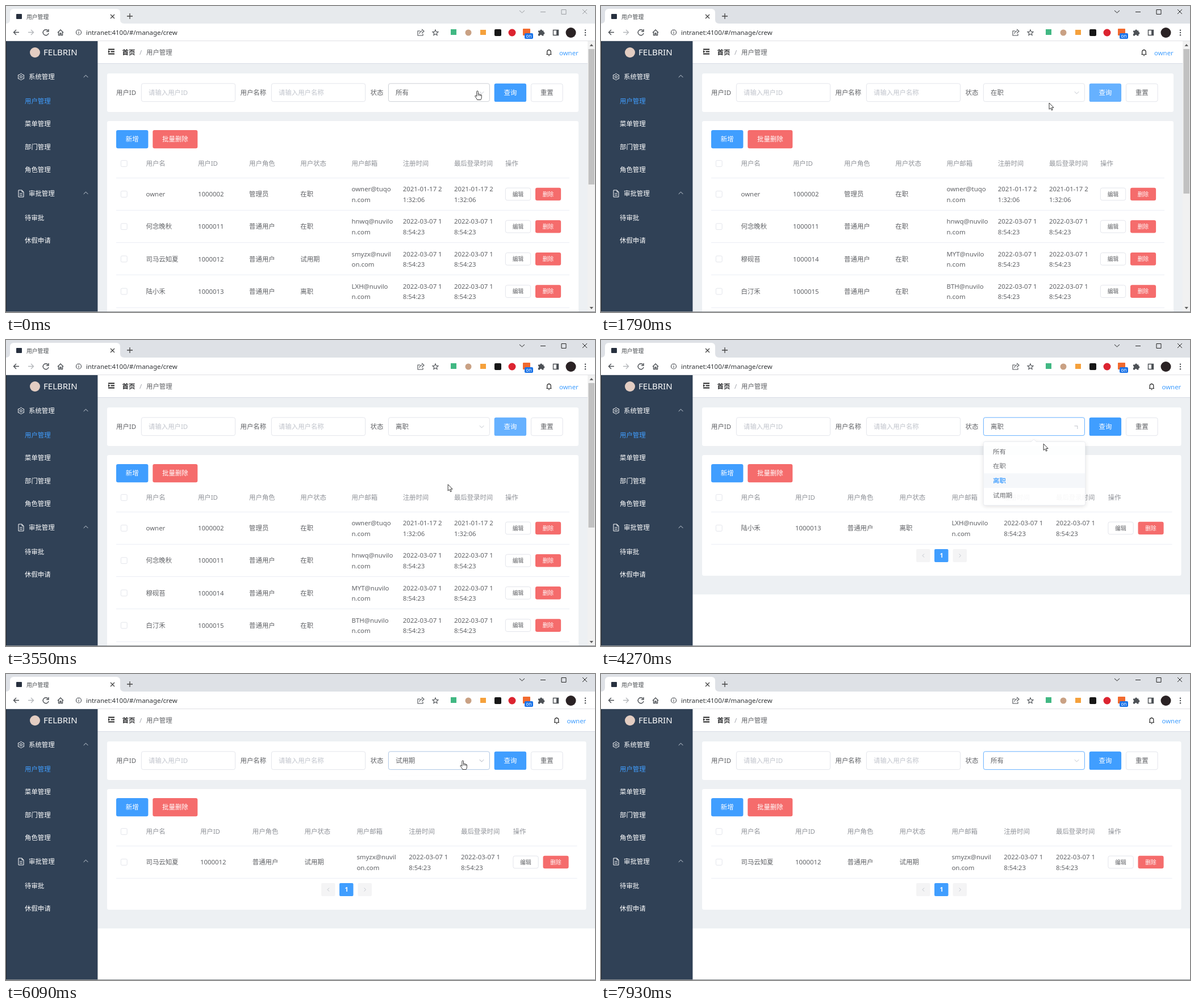
Recreate the animation shown at these times as an HTML page. Size 1037 px wide and 540 px high, loop 8000 ms.

```html
<!DOCTYPE html>
<html lang="zh">
<head>
<meta charset="utf-8">
<title>用户管理</title>
<style>
  html, body { margin: 0; width: 100%; height: 100%; overflow: hidden; background: #fff; }
  svg { display: block; font-family: "Noto Sans", "Noto Sans CJK SC", "Noto Sans CJK", sans-serif; }
  text { white-space: pre; }
  .menu { filter: drop-shadow(0 2px 4px rgba(0, 0, 0, .12)); }
</style>
</head>
<body>
<svg id="stage" width="1037" height="540" viewBox="0 0 1037 540"></svg>
<script>
const LOOP = 8000, STEP = 137.3, END = 7930;
const BLUE = '#409eff', RED = '#f56c6c', INK = '#606266', LINE = '#dcdfe6', PALE = '#c0c4cc';
const OPTIONS = ['所有', '在职', '离职', '试用期'];
const HEADS = ['用户名', '用户ID', '用户角色', '用户状态', '用户邮箱', '注册时间', '最后登录时间', '操作'];

// Each search: open the menu, pick an option, press the query button, wait for rows, move off.
const SEARCHES = [
  { option: 1, open: 400, pick: 1240, query: 1520, load: 1670, seat: [830, 150], pickX: 784, rest: [1773, 789, 171] },
  { option: 2, open: 2030, pick: 3000, query: 3410, load: 3700, seat: [782, 158], pickX: 739, rest: [3550, 778, 257] },
  { option: 3, open: 4120, pick: 5000, query: 5400, load: 5670, seat: [784, 157], pickX: 762, rest: [5940, 805, 153] },
  { option: 0, open: 6090, pick: 6600, query: LOOP, load: LOOP, seat: [804, 153], pickX: 758, rest: [7380, 566, 327] }
];
const optionY = i => 198 + 27.3 * i;

const PATH = [[0, ...SEARCHES[0].seat]];
for (const s of SEARCHES) {
  PATH.push([s.open, ...s.seat], [s.pick, s.pickX, optionY(s.option) - 4]);
  if (s.query < LOOP) PATH.push([s.query, 882, 150]);
  PATH.push(s.rest);
}

const JOINED = ['2022-03-07 1', '8:54:23'];
const person = (name, id, status, mail, date = JOINED, role = '普通用户') =>
  [name, '10000' + id, role, status, mail, date, date];
const USERS = [
  person('owner', '02', '在职', ['owner@tuqo', 'n.com'], ['2021-01-17 2', '1:32:06'], '管理员'),
  person('何念晚秋', '11', '在职', ['hnwq@nuvilo', 'n.com']),
  person('司马云知夏', '12', '试用期', ['smyzx@nuvil', 'on.com']),
  person('陆小禾', '13', '离职', ['LXH@nuvilo', 'n.com']),
  person('穆砚苔', '14', '在职', ['MYT@nuvilo', 'n.com']),
  person('白汀禾', '15', '在职', ['BTH@nuvilo', 'n.com'])
];

const clamp = v => Math.max(0, Math.min(1, v));
const mix = (a, b, k) => a + (b - a) * k;

// Drawing helpers
const rect = (x, y, w, h, fill, r = 0, extra = '') =>
  `<rect x="${x}" y="${y}" width="${w}" height="${h}" rx="${r}" fill="${fill}" ${extra}/>`;
const disc = (x, y, r, fill) => `<circle cx="${x}" cy="${y}" r="${r}" fill="${fill}"/>`;
const path = (d, stroke, w = 1, extra = '') =>
  `<path d="${d}" fill="none" stroke="${stroke}" stroke-width="${w}" ${extra}/>`;
const at = (x, y, body, more = '') => `<g transform="translate(${x} ${y}) ${more}">${body}</g>`;
const text = (x, y, s, fill = INK, size = 11.4, extra = '') =>
  `<text x="${x}" y="${y + size * .37}" fill="${fill}" font-size="${size}" ${extra}>${s}</text>`;
const mid = (x, y, s, fill, size, extra = '') => text(x, y, s, fill, size, 'text-anchor="middle" ' + extra);
const outline = (x, y, w, h, r = 3.2, stroke = LINE) =>
  rect(x + .4, y + .4, w - .8, h - .8, '#fff', r, `stroke="${stroke}" stroke-width=".8"`);
const box = (x, y, w, h, label, fill, size) =>
  (fill ? rect(x, y, w, h, fill, 3.2) : outline(x, y, w, h)) +
  mid(x + w / 2, y + h / 2, label, fill ? '#fff' : INK, size);
const button = (x, y, label, fill) => box(x, y, 33.8 + 11.3 * label.length, 32.3, label, fill);
const field = (x, label, hint, labelX) =>
  text(labelX, 153, label) + outline(x, 136.4, 166, 32.6) + text(x + 13, 153, hint, PALE);
const checkbox = y => outline(202, y - 5.8, 11.6, 11.6, 1.8);
const chevron = (x, y, turn, color, s = 3.8) =>
  at(x, y, path(`M${-s} ${s / 2}L0 ${-s / 2}L${s} ${s / 2}`, color), `rotate(${turn})`);

function browser(active) {
  const ink = active ? '#222' : '#9a9da1', icon = '#4d5156';
  return rect(0, 0, 1037, 31, active ? '#dee1e6' : '#e7eaed') +
    '<path d="M0 31Q7 31 7 24V12Q7 5 14 5H194Q201 5 201 12V24Q201 31 208 31Z" fill="#fff"/>' +
    rect(0, 31, 1037, 31, '#fff') + rect(0, 61, 1037, 1, '#dfe1e5') +
    rect(18, 14, 10, 9, '#27303f', 1) + text(36, 19, '用户管理', '#45494d', 9.8) +
    path('M184 15L191 22M191 15L184 22M213 18H223M218 13V23', '#444', 1.3) +
    path('M904 8L908.5 12L913 8M941 10.5H950M978 6.5H986V14.5H978ZM1015 6L1023 14M1023 6L1015 14', ink) +
    path('M23 46.5H13.5M18 42L13.5 46.5L18 51M74 43.5A5 5 0 1 0 75 48M75 41V45H71' +
      'M91 47L96 42L101 47M92.5 46V51.5H95V48H97V51.5H99.5V46', icon, 1.4) +
    path('M39 46.5H48.5M44 42L48.5 46.5L44 51', '#b5b8bc', 1.4) +
    path('M132.5 46.5A4.5 4.5 0 1 1 123.5 46.5A4.5 4.5 0 1 1 132.5 46.5M128 46V49M128 43.5V44.7', icon, 1.2) +
    text(141, 47, 'intranet:4100/#/manage/crew', '#303336') +
    path('M729 44H725V52H734V49M728 49Q729 44 733 44M732 41L736 44.5L732 48' +
      'M756 42L757.4 45.3L761 45.6L758.3 48L759.1 51.5L756 49.6L752.9 51.5L753.7 48L751 45.6L754.6 45.3Z', icon, 1.1) +
    rect(783, 41, 10, 10, '#41b883') + disc(814, 47, 5.5, '#c9a184') + rect(835, 42, 10, 9, '#f5a13c') +
    rect(860, 41, 12, 12, '#161616', 2) + disc(891, 47, 6.5, '#dc2430') +
    rect(910, 40, 13, 12, '#f26a2e', 1) + rect(913, 48, 15, 10, '#1a73e8', 2) + mid(920.5, 53, 'on', '#fff', 8) +
    `<path d="M937 43.5H940.2A1.9 1.9 0 0 1 944 43.5H946.5V46A1.9 1.9 0 0 1 946.5 49.8V52.5H943.5
      A1.7 1.7 0 0 0 940 52.5H937V49.3A1.7 1.7 0 0 0 937 46Z" fill="${icon}"/>` +
    path('M963.5 42.5H972.5V51.5H963.5Z', icon, 1.4) + rect(969, 42, 4, 10, icon) +
    disc(994.5, 47, 9, '#2a2224') + [-1, 0, 1].map(i => disc(1020, 47 + 4.3 * i, 1.2, icon)).join('');
}

function sidebar() {
  const gear = path('M0-6L1.8-4.2L5.2-3L4.6 0L5.2 3L1.8 4.2L0 6L-1.8 4.2L-5.2 3L-4.6 0L-5.2-3L-1.8-4.2Z' +
    'M2 0A2 2 0 1 1-2 0A2 2 0 1 1 2 0', '#fff', 1, 'stroke-linejoin="round"');
  const sheet = path('M-4.5-6H1.5L4.5-3V6H-4.5ZM1.5-6V-3H4.5M-2.3 0H2.3M-2.3 3H2.3', '#fff');
  const group = (y, icon, title, items, active) =>
    at(26.5, y, icon) + text(40, y, title, '#fff') + chevron(140.5, y - 1, 0, '#cfd6df') +
    items.map((s, i) => text(33, y + 43 + 40.2 * i, s, i === active ? BLUE : '#fff')).join('');
  return rect(0, 62, 161.4, 478, '#304156') + rect(0, 62, 1, 478, '#20262e') +
    disc(51, 82, 9, '#e3cdc2') + text(66, 81.5, 'FELBRIN', '#fff', 15) +
    group(125, gear, '系统管理', ['用户管理', '菜单管理', '部门管理', '角色管理'], 0) +
    group(331, sheet, '审批管理', ['待审批', '休假申请']);
}

function topbar(shift) {
  const bell = path('M-4.5 3.5H4.5M-3.3 3.5V-1A3.3 3.3 0 0 1 3.3-1V3.5M0-4.3V-5.5M-1.3 5.5H1.3', '#222', 1.2);
  return rect(161, 62, 876, 40, '#fff') + rect(161, 101, 876, 1, '#d8dce5') +
    path('M180 76.5H191M184.5 80.5H191M180 84.5H191', '#222', 1.9) + '<path d="M180 78V83L183.3 80.5Z" fill="#222"/>' +
    text(204.5, 82, '首页', '#303133', 11.4, 'font-weight="700"') + text(235, 82, '/', '#a0a4ac') +
    text(247, 82, '用户管理') + at(956 + shift, 82, bell) + text(974 + shift, 83, 'owner', BLUE);
}

function table(rows, shift) {
  const pitch = 90.2 + shift * .12;
  const col = i => i ? 247.7 + shift * .18 + pitch * i : 246.5;
  const rule = y => rect(194, y, 798 + shift, 1, '#ebeef5');
  let out = checkbox(278) + HEADS.map((h, i) => text(col(i), 278, h, '#909399')).join('') + rule(303);
  rows.forEach((user, n) => {
    const y = 332 + 57.2 * n;
    out += checkbox(y) + rule(Math.round(y + 28));
    user.forEach((v, i) => {
      out += [].concat(v).map((s, k, all) => text(col(i), y + (all.length - 1) * (18.4 * k - 9), s)).join('');
    });
    out += box(879 + shift, y - 11.3, 45.1, 22.6, '编辑', '', 9.7) +
      box(932 + shift, y - 11.3, 45.1, 22.6, '删除', RED, 9.7);
  });
  return out;
}

function pager() {
  return [555, 587, 619.5].map((x, i) => rect(x, 369, 24.5, 23, i === 1 ? BLUE : '#f4f4f5', 2)).join('') +
    chevron(567.5, 380.5, -90, PALE, 3) + chevron(632, 380.5, 90, PALE, 3) +
    mid(599.5, 380.5, '1', '#fff', 10.6, 'font-weight="700"');
}

function scrollbar(end) {
  return rect(1024, 62, 13, 478, '#f1f1f1') + rect(1025.5, 76, 10.5, end - 76, '#c1c1c1') +
    '<path d="M1027.5 71L1030.8 67L1034 71ZM1027.5 531L1030.8 535L1034 531Z" fill="#606060"/>';
}

function menu(amount, chosen, hovered) {
  const scale = 1 - (1 - amount) ** 4;
  const items = OPTIONS.map((o, i) => {
    const y = optionY(i), on = i === chosen;
    return (i === hovered ? rect(673.8, y - 13.6, 178.2, 27.3, '#f5f7fa') : '') +
      text(690, y, o, on ? BLUE : INK, 11.4, on ? 'font-weight="700"' : '');
  }).join('');
  return `<g class="menu" opacity="${scale}" transform="translate(0 ${179 * (1 - scale)}) scale(1 ${scale})">` +
    outline(673, 179, 180, 120.5, 3.2, '#e4e7ed') +
    '<path d="M757 180L762 175L767 180" fill="#fff" stroke="#e4e7ed" stroke-width=".8"/>' + items + '</g>';
}

function pointer(x, y, hand) {
  const d = hand
    ? `M-1.3 9V1.2A1.3 1.3 0 0 1 1.3 1.2V5.4Q2.6 4.7 3.5 5.8Q4.8 5.2 5.5 6.4Q7.3 6.2 7.3 8V10.8
       Q7.3 13.4 5.8 15.5H-.3Q-1.6 12.6-4 9.8Q-4.7 8.3-3.3 8Q-2.3 8-1.3 9.6Z`
    : 'M0 0V11.3L2.6 9L4.4 13L6.2 12.2L4.4 8.3H8Z';
  return at(x, y, `<path d="${d}" fill="#fff" stroke="#222" stroke-width=".9" stroke-linejoin="round"/>` +
    (hand ? path('M1.3 5.4V8.5M3.5 6V8.7M5.5 6.6V9', '#222', .8) : ''));
}

function pointerAt(t) {
  const tick = Math.max(0, 400 + Math.floor((t - 380) / STEP) * STEP);
  const n = PATH.findIndex(p => p[0] > tick);
  if (n < 0) return t < 7810 ? PATH[PATH.length - 1].slice(1) : [498, 499];
  const [t0, x0, y0] = PATH[n - 1], [t1, x1, y1] = PATH[n];
  const k = Math.sin((tick - t0) / (t1 - t0) * Math.PI / 2);
  return [mix(x0, x1, k), mix(y0, y1, k)];
}

function draw(t) {
  const done = key => SEARCHES.filter(s => s[key] <= t).pop();
  const optionOf = s => s ? s.option : 0;
  const now = done('open'), chosen = optionOf(done('pick')), filter = optionOf(done('load'));
  const rows = USERS.filter(u => !filter || u[3] === OPTIONS[filter]).slice(0, 4);
  const short = rows.length === 1, shift = short ? 13.5 : 0;

  const [x, y] = pointerAt(t);
  const inside = (a, b, top = 137, end = 169) => x >= a && x <= b && y >= top && y <= end;
  const overSelect = inside(673, 852), overQuery = inside(860, 916);
  const open = now && t < now.pick;
  const overMenu = open && inside(673, 852, 184.4, 293.6);
  const hovered = overMenu ? Math.round((y + 4 - optionY(0)) / 27.3) : chosen;
  const shown = !now ? 0 : open ? clamp((t - now.open) / 300) : 1 - clamp((t - now.pick) / 300);

  const focus = now && t < now.query;
  const glow = focus ? clamp((t - now.open + 60) / 200) : 0;
  const border = focus ? `rgb(${mix(192, 64, glow)},${mix(196, 158, glow)},${mix(204, 255, glow)})`
    : overSelect ? PALE : LINE;
  const query = (now && !focus) || overQuery ? '#66b1ff' : BLUE;

  return browser(t >= 400) +
    rect(161, 102, 876, 438, '#edf0f3') + (short ? rect(161, 449, 876, 91, '#fff') : '') + topbar(shift) +
    rect(178, 119, 830 + shift, 68, '#fff', 3.2) + rect(178, 203, 830 + shift, short ? 213 : 345, '#fff', 3.2) +
    field(238, '用户ID', '请输入用户ID', 194) + field(467, '用户名称', '请输入用户名称', 412.5) +
    text(641.5, 153, '状态') + outline(673, 136.4, 178.8, 32.6, 3.2, border) + text(686, 153, OPTIONS[chosen]) +
    chevron(837.5, 153, 180 * (1 - shown) ** 2, PALE) +
    button(859.7, 136.8, '查询', query) + button(924.1, 136.8, '重置') +
    button(194, 219, '新增', BLUE) + button(258.3, 219, '批量删除', RED) +
    table(rows, shift) + (short ? pager() : scrollbar(filter ? 331 : 315)) +
    sidebar() + rect(0, 539, 1037, 1, '#8b8f94') +
    (shown > 0 ? menu(shown, chosen, hovered) : '') +
    (t < END ? pointer(x, y, overSelect || overQuery || inside(924, 980) || overMenu) : '');
}

const stage = document.getElementById('stage');
let last = '';
function loop() {
  const next = draw(performance.now() % LOOP);
  if (next !== last) stage.innerHTML = last = next;
  requestAnimationFrame(loop);
}
loop();
</script>
</body>
</html>
```
